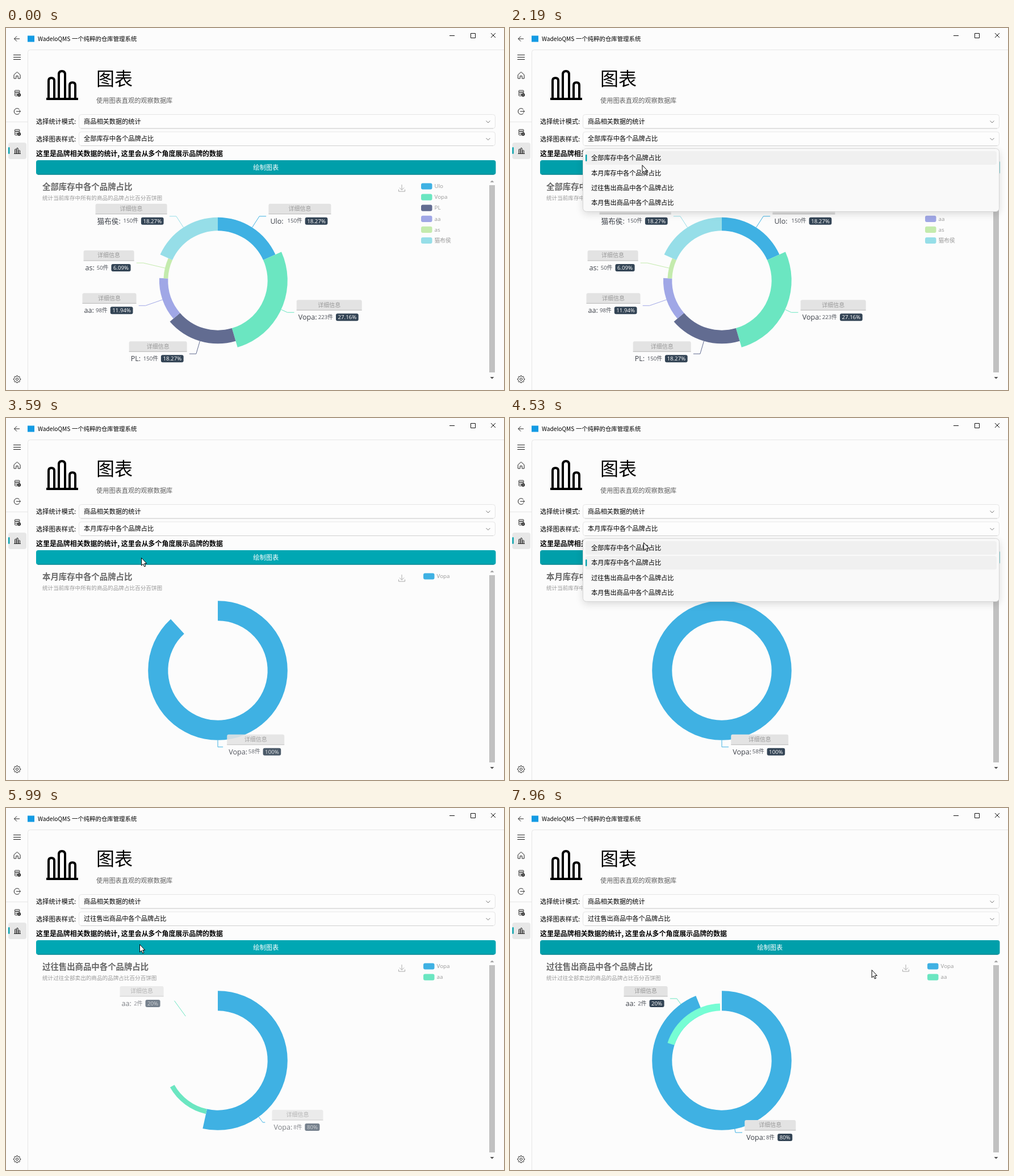
Recreate the animation shown at these times as an HTML page with a canvas. Size 877x638 px, loop 8 s.

```html
<!DOCTYPE html>
<html lang="zh">
<head>
<meta charset="utf-8">
<style>
html, body { margin: 0; width: 100%; height: 100%; overflow: hidden; background: #fcfcfc; }
canvas { display: block; width: 877px; height: 638px; }
</style>
</head>
<body>
<canvas id="stage"></canvas>
<script>
const W = 877, H = 638, LOOP = 8000;
const canvas = document.getElementById('stage');
const dpr = window.devicePixelRatio || 1;
canvas.width = W * dpr;
canvas.height = H * dpr;
const ctx = canvas.getContext('2d');

const UI = '"Noto Sans CJK SC", "Noto Sans CJK", sans-serif';
const LATIN = '"Open Sans", "Noto Sans CJK SC", "Noto Sans CJK", sans-serif';
const TEAL = '#009faa';
const BLUE = '#3fb1e3', MINT = '#6be6c1';

// Pie geometry
const CX = 373, CY = 445, INNER = 87.7, OUTER = 122.8, ELBOW = 134.8;
const rad = Math.PI / 180;

const modes = ['全部库存中各个品牌占比', '本月库存中各个品牌占比', '过往售出商品中各个品牌占比', '本月售出商品中各个品牌占比'];
const item = (name, value, color, width) => ({ name, value, color, width });
const stockNote = '统计当前库存中所有的商品的品牌占比百分百饼图';
const charts = [
  { start: -2000, note: stockNote, legendX: 731, items: [
    item('Ulo', 150, BLUE, 110), item('Vopa', 223, MINT, 115), item('PL', 150, '#626c91', 102),
    item('aa', 98, '#a0a7e6', 95), item('as', 50, '#c4ebad', 89), item('猫布侯', 150, '#96dee8', 126)] },
  { start: 2900, note: stockNote, legendX: 735, items: [item('Vopa', 58, BLUE, 101)] },
  { start: 5427, note: '统计过往全部卖出的商品的品牌占比百分百饼图', legendX: 735,
    items: [item('Vopa', 8, BLUE, 90), item('aa', 2, MINT, 77)] }
];
const toggles = [6930, 7230, 7530, 7834];
const popups = [{ open: 1790, close: 2420, selected: 0 }, { open: 4290, close: 4880, selected: 1 }];
const comboPresses = [[1590, 1790], [4200, 4290]];
const buttonPresses = [[2815, 2895], [5240, 5345]];
const cursorPath = [ // time, x, y
  [270, 518, 636], [1070, 272, 268], [1440, 215, 198], [1900, 215, 198], [2250, 236, 250],
  [2420, 236, 250], [2560, 238, 246], [3900, 238, 246], [4060, 236, 211], [4180, 235, 199],
  [4340, 235, 199], [4530, 235, 219], [4800, 235, 274], [5010, 235, 274], [5100, 235, 240],
  [6090, 235, 240], [6880, 750, 297], [7834, 750, 297], [7960, 637, 285], [8000, 625, 285]
];

const clamp = v => Math.max(0, Math.min(1, v));
const mix = (a, b, k) => a + (b - a) * k;
const cubicInOut = p => p < .5 ? 4 * p ** 3 : 1 - (2 - 2 * p) ** 3 / 2;
const cubicOut = p => 1 - (1 - p) ** 3;
const during = (spans, t) => spans.some(([a, b]) => t >= a && t < b);
const inside = (p, x, y, w, h) => p && p.x >= x && p.x < x + w && p.y >= y && p.y < y + h;
const polar = (angle, r) => ({ x: CX + r * Math.sin(angle * rad), y: CY - r * Math.cos(angle * rad) });

function text(str, x, yMid, size, color, { font = UI, weight = 400, align = 'left' } = {}) {
  ctx.font = `${weight} ${size}px ${font}`;
  ctx.textAlign = align;
  ctx.fillStyle = color;
  ctx.fillText(str, x, yMid + size * .38);
}

function box(x, y, w, h, r, fill, stroke) {
  ctx.beginPath();
  ctx.roundRect(x, y, w, h, r);
  if (fill) { ctx.fillStyle = fill; ctx.fill(); }
  if (stroke) { ctx.strokeStyle = stroke; ctx.lineWidth = 1; ctx.stroke(); }
}

function line(d, color = '#222', width = 1) {
  ctx.strokeStyle = color;
  ctx.lineWidth = width;
  ctx.stroke(new Path2D(d));
}

function fill(d, color) {
  ctx.fillStyle = color;
  ctx.fill(new Path2D(d));
}

function gear(x, y, r) {
  ctx.beginPath();
  for (let i = 0; i < 48; i++) {
    const a = i * Math.PI / 24, q = r * (.88 + .12 * Math.tanh(3 * Math.cos(8 * a)));
    ctx.lineTo(x + q * Math.cos(a), y + q * Math.sin(a));
  }
  ctx.closePath();
  ctx.moveTo(x + r * .33, y);
  ctx.arc(x, y, r * .33, 0, 7);
  ctx.strokeStyle = '#222';
  ctx.lineWidth = 1;
  ctx.stroke();
}

function shelf(y) {
  box(15.5, y - 5, 8.5, 3.2, 1, null, '#222');
  box(15.5, y - 1.8, 8.5, 3.2, 1, null, '#222');
  line(`M20 ${y + 4.6}h-3.5q-1 0-1-1v-2`);
  ctx.beginPath();
  ctx.arc(23, y + 3, 3, 0, 7);
  ctx.fillStyle = '#222';
  ctx.fill();
  fill(`M22.5 ${y + 1.5}h1v3h-1z`, '#fff');
}

function drawWindow() {
  ctx.fillStyle = '#fcfcfc';
  ctx.fillRect(0, 0, W, H);
  line('M877 38.5H42.5q-4 0-4 4V638M0 165.5H38', '#e6e6e6');
  line('M24 19H14.5m4.5-4.5L14.5 19l4.5 4.5');
  box(38, 13.5, 12, 11, 0, '#149be4');
  text('WadeloQMS', 56, 19, 10.2, '#000');
  text('一个纯粹的仓库管理系统', 116, 19, 10.4, '#000');
  line('M781 13.5h9M818.5 9.5h8v8h-8zM854 9l8 8m0-8l-8 8', '#111');

  line('M13 47.5h13M13 51.5h13M13 55.5h13');
  line('M14 82.5l5.5-5 5.5 5v6.5h-3.8v-4.5h-3.4v4.5H14z');
  shelf(115);
  line('M23.5 143.5a5.3 5.3 0 1 0 0 7M18 147h7.5m-2.2-2.2l2.2 2.2-2.2 2.2');
  shelf(184);
  box(4, 202, 32, 29, 4, '#e7e7e7');
  box(4, 210, 2.4, 12, 1.2, TEAL);
  line('M14 221.5h12M15.5 221v-7q1.2-1.5 2.4 0v7M18.8 221v-9q1.2-1.5 2.4 0v9M22.2 221v-5q1.2-1.5 2.4 0v5');
  gear(19.5, 619, 6.3);

  line('M71 125h56M75 125V93q0-5 5-5t5 5v32M93 125V82q0-6 5.5-6t5.5 6v43M112 125v-24q0-5 5-5t5 5v24', '#000', 4);
  text('图表', 159, 89, 32, '#000');
  text('使用图表直观的观察数据库', 159, 128, 11.2, '#606060');
  text('选择统计模式:', 53, 165, 11.2, '#000');
  text('选择图表样式:', 53, 195.5, 11.2, '#000');
  text('这里是品牌相关数据的统计, 这里会从多个角度展示品牌的数据', 53, 221, 11.95, '#000', { weight: 700 });
}

function drawCombo(y, label, hovered, pressed) {
  box(128.5, y + .5, 733, 24.5, 4, hovered || pressed ? '#fafafa' : '#fdfdfd', '#e5e5e5');
  if (!pressed) line(`M132 ${y + 25}H858`, '#d0d0d0');
  text(label, 137, y + 12.7, 11.2, pressed ? '#606060' : '#000');
  line(`M845.5 ${y + 11.5}l3.5 3.5 3.5-3.5`, '#777');
}

function drawButton(hovered, pressed) {
  box(53, 233, 809.5, 25.5, 4, pressed ? '#3eabb3' : hovered ? '#00a7b3' : TEAL);
  if (!pressed) line('M56 258H859', '#007780');
  text('绘制图表', 457.7, 245.5, 11.2, pressed ? '#ffffffa0' : '#fff', { align: 'center' });
}

function layout(items) {
  const sum = items.reduce((s, d) => s + d.value, 0);
  const max = Math.max(...items.map(d => d.value));
  let angle = 0;
  return items.map(d => {
    const a0 = angle, a1 = angle += d.value / sum * 360, mid = (a0 + a1) / 2;
    const r = INNER + (OUTER - INNER) * d.value / max;
    return { ...d, a0, a1, r, edge: polar(mid, r), elbow: polar(mid, ELBOW), side: mid > 180.01 ? -1 : 1,
      percent: +(d.value / sum * 100).toFixed(2) + '%', alpha: 1 };
  });
}

// Legend toggling of the second item: the first one grows to fill the ring and shrinks back.
function toggled(items, t) {
  const count = toggles.filter(s => t >= s).length;
  const since = t - toggles[count - 1], on = count % 2 === 0;
  const pair = layout(items), solo = layout(items.slice(0, 1))[0];
  const from = on ? solo : pair[0], to = on ? pair[0] : solo;
  const e = cubicInOut(clamp(since / 300));
  const blend = key => ({ x: mix(from[key].x, to[key].x, e), y: mix(from[key].y, to[key].y, e) });
  const first = { ...to, a1: mix(from.a1, to.a1, e), edge: blend('edge'), elbow: blend('elbow'), width: on ? 90 : 95 };
  const second = pair[1];
  if (on) second.a1 = mix(second.a0, second.a1, cubicOut(clamp(since / 180)));
  else second.alpha = 1 - clamp(since / 200);
  return { slices: [first, second], on };
}

const lift = hex => '#' + hex.slice(1).match(/../g)
  .map(c => Math.min(255, Math.round(parseInt(c, 16) * 1.1)).toString(16).padStart(2, '0')).join('');

function hits(slice, p) {
  if (!p) return false;
  const d = Math.hypot(p.x - CX, p.y - CY);
  const a = (Math.atan2(p.x - CX, CY - p.y) / rad + 360) % 360;
  return d > INNER && d < slice.r && a >= slice.a0 && a < slice.a1;
}

function drawLeader(s, e) {
  const end = s.elbow.x + 12 * s.side;
  const length = Math.hypot(s.elbow.x - s.edge.x, s.elbow.y - s.edge.y) + 12;
  ctx.globalAlpha = s.alpha;
  ctx.setLineDash([length * e, 999]);
  line(`M${s.edge.x} ${s.edge.y}L${s.elbow.x} ${s.elbow.y}H${end}`, s.color);
  ctx.setLineDash([]);
}

function drawSlice(s, e, emphasised) {
  const a = (s.a0 * e - 90) * rad, b = (s.a1 * e - 90) * rad;
  ctx.globalAlpha = s.alpha;
  ctx.beginPath();
  ctx.arc(CX, CY, s.r + (emphasised ? 4 : 0), a, b);
  ctx.arc(CX, CY, INNER, b, a, true);
  ctx.fillStyle = emphasised ? lift(s.color) : s.color;
  ctx.fill();
}

function drawLabel(s, e) {
  const tip = s.elbow.x + 16.2 * s.side;
  const left = s.side > 0 ? tip : tip - s.width, right = left + s.width, top = s.elbow.y - 22;
  ctx.globalAlpha = e * s.alpha;
  box(left, top, s.width, 18, [3, 3, 0, 0], '#e3e3e3');
  line(`M${left} ${top + 18}H${right}`, '#aaa', .8);
  text('详细信息', (left + right) / 2, top + 8.5, 10, '#999', { align: 'center' });
  text(s.name + ':', left + 3, top + 30, 12.6, '#3c4048', { font: LATIN });
  ctx.font = `400 9.7px ${LATIN}`;
  const badge = ctx.measureText(s.percent).width + 7;
  box(right - 6 - badge, top + 24, badge, 13, 3, '#334455');
  text(s.percent, right - 6 - badge / 2, top + 30.3, 9.7, '#fff', { font: LATIN, align: 'center' });
  text(s.value + '件', right - 11 - badge, top + 30, 9.7, '#4c5058', { font: LATIN, align: 'right' });
}

function drawChart(t, cursor) {
  const index = charts.findLastIndex(c => t >= c.start);
  const { start, note, legendX, items } = charts[index];
  const e = cubicInOut(clamp((t - start) / 1000));
  let slices = layout(items), secondOn = true, legendHover = false;
  if (t >= toggles[0]) ({ slices, on: secondOn } = toggled(items, t));
  if (t >= 6860) legendHover = true;

  text(modes[index], 64, 280, 14.4, '#666', { weight: 700 });
  text(note, 64, 299.5, 9.6, '#999');
  line('M697 276v9m-4-3.5l4 4 4-4M691.5 284.500v3.500h11v-3.500', '#aaa');
  items.forEach((d, i) => {
    const y = 279 + 19.1 * i, off = i === 1 && !secondOn;
    box(legendX, y - 5.6, 19.5, 11.2, 3, off ? '#ccc' : d.color);
    text(d.name, legendX + 23.5, y - .5, 9.8, off ? '#ccc' : '#999', { font: LATIN });
  });

  slices.forEach(s => drawLeader(s, e));
  slices.forEach((s, i) => drawSlice(s, e, legendHover ? i === 1 : e === 1 && hits(s, cursor)));
  slices.forEach(s => drawLabel(s, e));
  ctx.globalAlpha = 1;

  box(851, 277, 10, 330, 0, '#c1c1c1');
  fill('M852.500 272h7l-3.500-3.500z', '#a3a3a3');
  fill('M852.500 615h7l-3.500 3.500z', '#505050');
}

function drawPopup(t, cursor) {
  const popup = popups.find(p => t >= p.open && t < p.close);
  if (!popup) return;
  const p = clamp((t - popup.open) / 250), shift = -56 * (1 - p) ** 2;
  ctx.save();
  ctx.beginPath();
  ctx.rect(0, 208, W, 160);
  ctx.clip();
  ctx.translate(0, shift);
  ctx.shadowColor = 'rgba(0,0,0,.14)';
  ctx.shadowBlur = 14 * dpr;
  ctx.shadowOffsetY = 4 * dpr;
  box(128.5, 212.5, 733, 111, 6, '#f9f9f9');
  ctx.shadowColor = 'transparent';
  box(128.5, 212.5, 733, 111, 6, null, '#d6d6d6');
  modes.forEach((mode, i) => {
    const y = 229 + 26.3 * i;
    const hovered = inside(cursor, 133, y - 12.5 + shift, 724, 25);
    if (hovered || i === popup.selected) box(133, y - 12, 724, 24, 4, '#f0f0f0');
    if (i === popup.selected) box(133, y - 6, 2.4, 12, 1.2, TEAL);
    text(mode, 143, y, 11.2, '#000');
  });
  ctx.restore();
}

function cursorAt(t) {
  const next = cursorPath.findIndex(k => k[0] > t);
  if (next < 1) return null;
  const [t0, x0, y0] = cursorPath[next - 1], [t1, x1, y1] = cursorPath[next];
  const k = (t - t0) / (t1 - t0);
  return { x: mix(x0, x1, k), y: mix(y0, y1, k) };
}

function drawCursor(p) {
  if (!p) return;
  const arrow = `M${p.x + .5} ${p.y + .5}v13.500l3-2.800 2.200 4.800 2.200-1-2.200-4.600h4z`;
  fill(arrow, '#fff');
  line(arrow, '#000');
}

function draw(t) {
  ctx.setTransform(dpr, 0, 0, dpr, 0, 0);
  const cursor = cursorAt(t);
  const popupOpen = popups.some(p => t >= p.open && t < p.close);
  const mode = t < popups[0].close ? 0 : t < popups[1].close ? 1 : 2;
  const over = (y, h) => !popupOpen && inside(cursor, 53, y, 809, h);
  drawWindow();
  drawCombo(152, '商品相关数据的统计', false, false);
  drawCombo(182.5, modes[mode], over(182, 26), during(comboPresses, t));
  drawButton(over(233, 26), during(buttonPresses, t));
  drawChart(t, cursor);
  drawPopup(t, cursor);
  drawCursor(cursor);
}

const begin = performance.now();
function tick() {
  draw((performance.now() - begin) % LOOP);
  requestAnimationFrame(tick);
}
tick();
</script>
</body>
</html>
```
